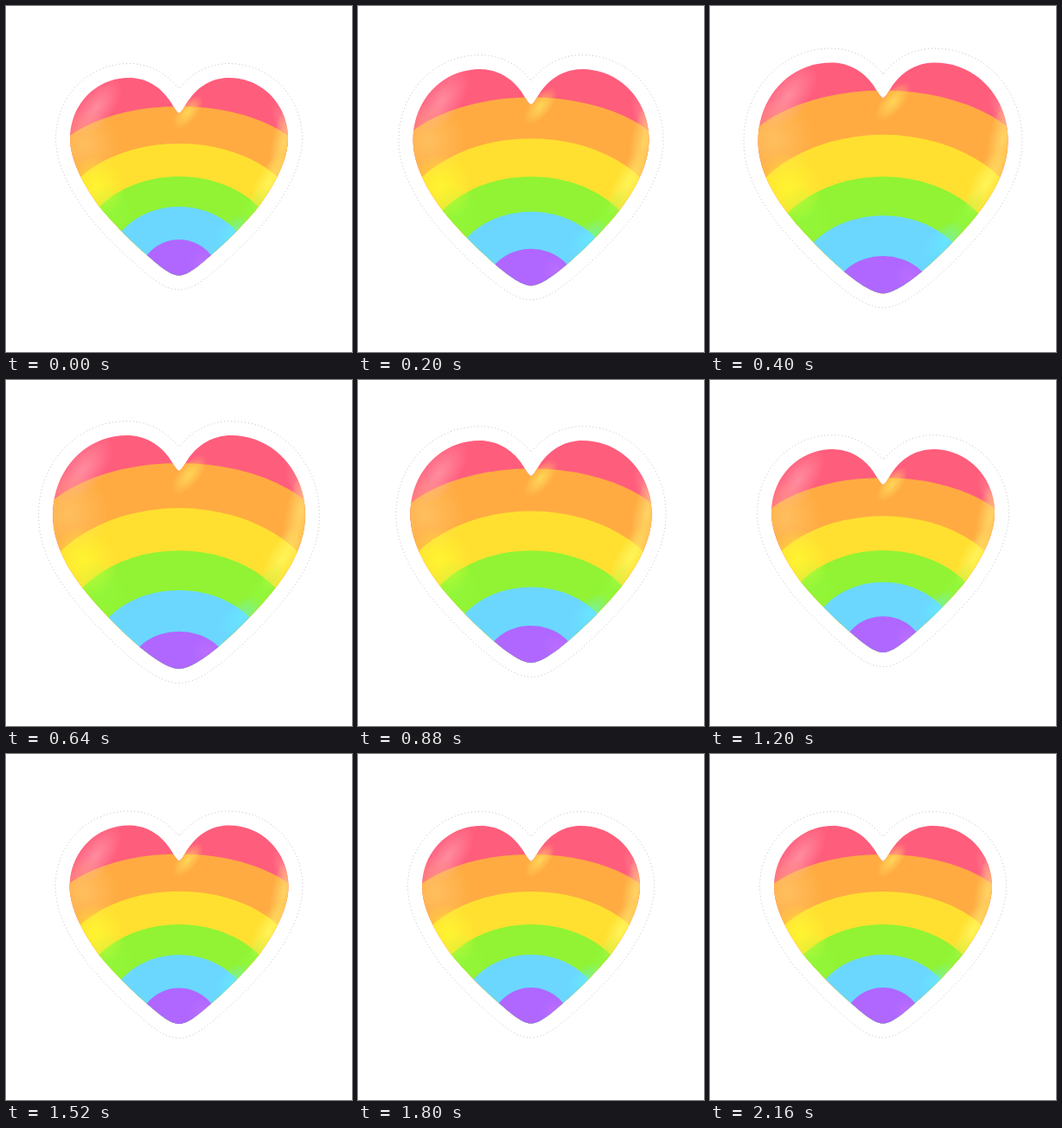
Animation, 400 px wide and 400 px high, one loop 2.2 s. Source, as an HTML page with a canvas:

```html
<!DOCTYPE html>
<html lang="en">
<head>
<meta charset="utf-8">
<title>Rainbow heart</title>
<style>
  html, body { margin: 0; width: 100%; height: 100%; overflow: hidden; background: #fff; }
  canvas { display: block; width: 100vw; height: 100vh; }
</style>
</head>
<body>
<canvas id="stage"></canvas>
<script>
const SIZE = 400, LOOP = 2200, STEP = 40, PEAK = 600, SETTLED = 1800;
const BORDER = 16.5;

// Right half of the heart as chained cubics, x measured from the centre line.
const SMALL = [0,124, 4,122, 6,116, 11,109, 22,93, 38,83, 58,83, 97,83, 126,115, 126,153,
  126,180, 108,210, 92,232, 78,249, 58,270, 37,288, 22,301, 10,311.5, 0,311.5];
const LARGE = [0,105, 4,103, 7,96, 12,89, 24,73, 41,64, 60,64, 110,64, 146,106, 146,156,
  146,186, 132,214, 111,241, 92,265, 67,290, 45,309, 28,323, 11,334, 0,334];

// Each band: colour, then crown y, end x, end y for the small and large heart.
const BANDS = [
  ['#ffab42', [116, 125, 149], [96, 143, 137]],
  ['#ffe030', [159, 113, 197], [148, 136, 197]],
  ['#91f333', [197, 92, 232], [197.3, 111, 239.5]],
  ['#6bd7ff', [232, 66, 260], [243, 82, 275]],
  ['#af67ff', [270, 37, 288], [290.7, 45, 308]]
];
// Half width of a band's ellipse relative to its visible end.
const SPREAD = 1.25;

// Soft light: x, y, rx, ry, angle, rgb, alpha
const GLOWS = [
  [-96, 118, 42, 20, -0.9, '255,180,188', 0.55],
  [120, 135, 10, 28, -0.35, '255,165,165', 0.45],
  [-110, 160, 40, 42, 0, '255,215,130', 0.45],
  [121, 160, 15, 50, 0.2, '255,230,115', 0.7],
  [10, 123, 11, 24, 0.7, '255,228,95', 0.75],
  [-95, 208, 32, 36, -0.5, '255,255,50', 0.65],
  [104, 204, 15, 38, 0.5, '255,255,110', 0.65],
  [-78, 236, 26, 32, -0.6, '150,255,70', 0.35],
  [84, 236, 13, 32, 0.6, '150,255,70', 0.4],
  [62, 262, 15, 26, 0.8, '100,240,255', 0.55],
  [27, 296, 16, 14, 0, '205,120,255', 0.4]
];

const canvas = document.getElementById('stage');
const ctx = canvas.getContext('2d');
const dpr = window.devicePixelRatio || 1;
canvas.width = canvas.height = SIZE * dpr;

const mix = (a, b, p) => a + (b - a) * p;
const mixAll = (a, b, p) => a.map((v, i) => mix(v, b[i], p));
const cubic = (a, b, c, d, s) => {
  const r = 1 - s;
  return r * r * r * a + 3 * r * r * s * b + 3 * r * s * s * c + s * s * s * d;
};
const slope = (a, b, c, d, s) => {
  const r = 1 - s;
  return r * r * (b - a) + 2 * r * s * (c - b) + s * s * (d - c);
};

// Timing curve with control points (x1, 0) and (x2, 1).
function ease(x, x1, x2) {
  let lo = 0, hi = 1;
  for (let i = 0; i < 24; i++) {
    const mid = (lo + hi) / 2;
    if (cubic(0, x1, x2, 1, mid) < x) lo = mid; else hi = mid;
  }
  return cubic(0, 0, 1, 1, lo);
}

function growth(t) {
  if (t < PEAK) return ease(t / PEAK, 0.33, 0.2);
  if (t < SETTLED) return 1 - ease((t - PEAK) / (SETTLED - PEAK), 0.38, 0.05);
  return 0;
}

// Points along the right half, pushed outwards by the given distance.
function halfOutline(pts, offset) {
  const out = [], n = 20;
  for (let i = 0; i + 7 < pts.length; i += 6) {
    const xs = [0, 2, 4, 6].map(k => pts[i + k]);
    const ys = [1, 3, 5, 7].map(k => pts[i + k]);
    for (let j = 0; j <= n; j++) {
      const s = j / n;
      const dx = slope(...xs, s), dy = slope(...ys, s), len = Math.hypot(dx, dy);
      const x = cubic(...xs, s) + dy / len * offset;
      const y = cubic(...ys, s) - dx / len * offset;
      if (x >= -0.01) out.push([x, y]);
    }
  }
  return out;
}

function trace(half) {
  ctx.beginPath();
  half.forEach(([x, y]) => ctx.lineTo(x, y));
  [...half].reverse().forEach(([x, y]) => ctx.lineTo(-x, y));
  ctx.closePath();
}

// Upper half of an ellipse through the crown and both ends, filled down to the tip.
function drawBand([color, small, large], p) {
  const [top, endX, endY] = mixAll(small, large, p);
  const rx = endX * SPREAD;
  const ry = (endY - top) / (1 - Math.sqrt(1 - 1 / (SPREAD * SPREAD)));
  ctx.fillStyle = color;
  ctx.beginPath();
  ctx.ellipse(0, top + ry, rx, ry, 0, Math.PI, Math.PI * 2);
  ctx.lineTo(rx, SIZE);
  ctx.lineTo(-rx, SIZE);
  ctx.fill();
}

function drawGlow([x, y, rx, ry, angle, rgb, alpha], p) {
  const sx = 1 + 0.159 * p, sy = 1 + 0.18 * p;
  ctx.save();
  ctx.translate(x * sx, 197 + (y - 197) * sy);
  ctx.rotate(angle);
  ctx.scale(rx * sx, ry * sy);
  const g = ctx.createRadialGradient(0, 0, 0, 0, 0, 1);
  g.addColorStop(0, `rgba(${rgb},${alpha})`);
  g.addColorStop(0.5, `rgba(${rgb},${alpha * 0.5})`);
  g.addColorStop(1, `rgba(${rgb},0)`);
  ctx.fillStyle = g;
  ctx.fillRect(-1, -1, 2, 2);
  ctx.restore();
}

function draw(p) {
  const pts = mixAll(SMALL, LARGE, p);
  ctx.setTransform(dpr, 0, 0, dpr, 0, 0);
  ctx.fillStyle = '#fff';
  ctx.fillRect(0, 0, SIZE, SIZE);
  ctx.translate(SIZE / 2, 0);

  trace(halfOutline(pts, BORDER));
  ctx.setLineDash([1, 3]);
  ctx.lineWidth = 0.6;
  ctx.strokeStyle = '#999';
  ctx.stroke();

  ctx.save();
  trace(halfOutline(pts, 0));
  ctx.clip();
  ctx.fillStyle = '#ff5d7c';
  ctx.fillRect(-SIZE / 2, 0, SIZE, SIZE);
  BANDS.forEach(band => drawBand(band, p));
  GLOWS.forEach(glow => drawGlow(glow, p));
  ctx.restore();
}

const start = performance.now();
function tick() {
  const t = (performance.now() - start) % LOOP;
  draw(growth(Math.floor(t / STEP) * STEP));
  requestAnimationFrame(tick);
}
tick();
</script>
</body>
</html>
```
